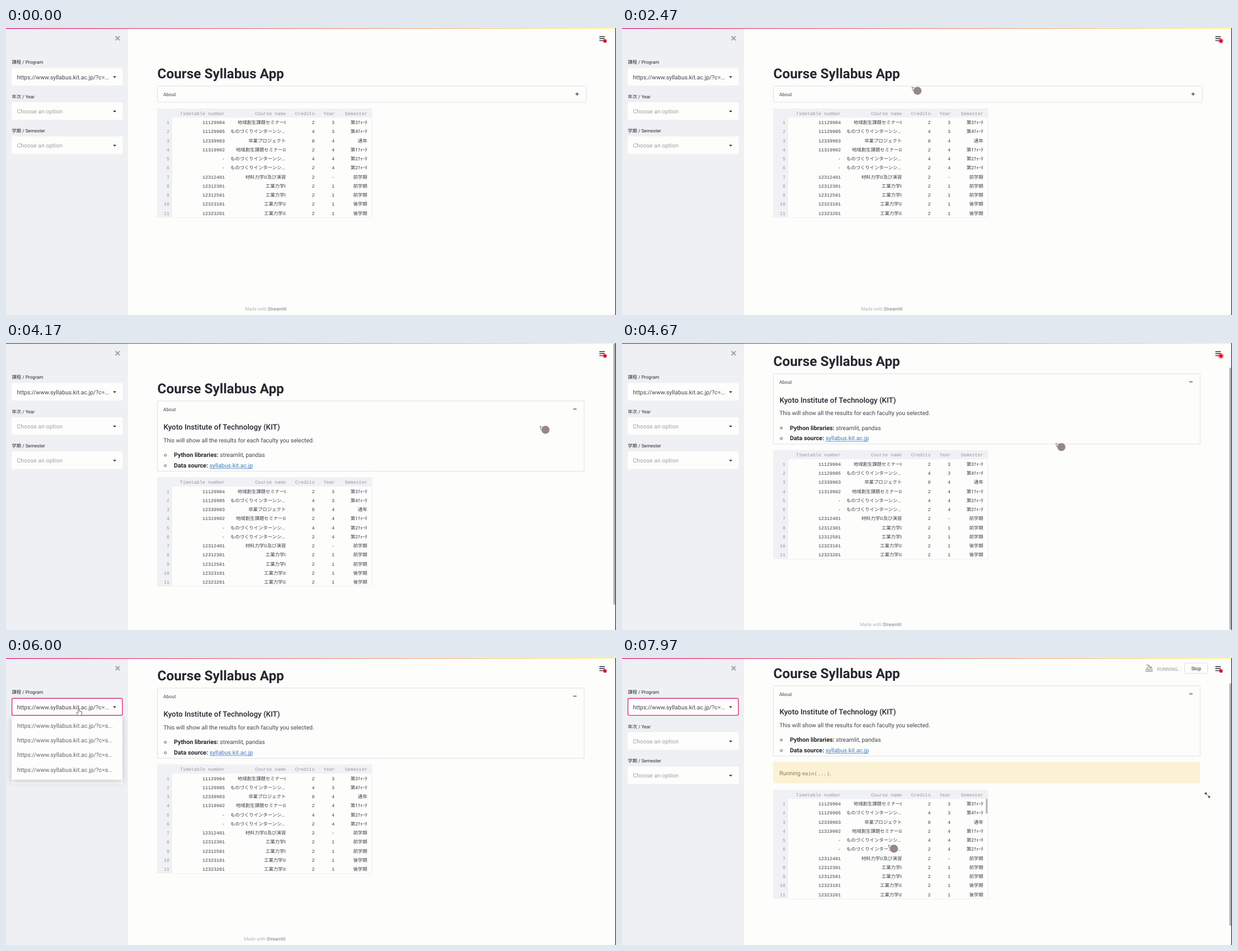
Animation, 1090 px wide and 514 px high, one loop 8 s. Source, as an HTML page with a canvas:

```html
<!DOCTYPE html>
<html lang="en">
<head>
<meta charset="utf-8">
<title>Course Syllabus App</title>
<style>
html, body { margin: 0; width: 100%; height: 100%; overflow: hidden; background: #fdfdfc; }
canvas { display: block; width: 1090px; height: 514px; }
</style>
</head>
<body>
<canvas id="stage"></canvas>
<script>
const W = 1090, H = 514, LOOP = 8000;
const canvas = document.getElementById('stage');
const c = canvas.getContext('2d');
const dpr = window.devicePixelRatio || 1;
canvas.width = W * dpr;
canvas.height = H * dpr;

const SANS = 'Roboto, "Noto Sans CJK JP", sans-serif';
const MONO = '"Liberation Mono", "Noto Sans CJK JP", monospace';
const MIXED = '"Liberation Serif", "Noto Sans CJK JP", serif';
const INK = '#262730', BODY = '#44454d', MUTED = '#a0a1a7';
const PAPER = '#fdfdfc', SIDE = '#eff0f3', PINK = '#d92f78';
const URL_TEXT = 'https://www.syllabus.kit.ac.jp/?c=';

// Times of the state changes
const OPEN = 3500, SCROLL = 4400, FOCUS = 5800, MENU = 6000, PICK = 7400, RUN = 7560;

// Pointer path: time, x, y
const PATH = [
  [500, -24, 70], [1230, 212, 87], [2470, 518, 106], [3300, 985, 117],
  [3600, 985, 118], [4170, 954, 149], [4970, 693, 194], [5700, 130, 90],
  [6300, 130, 90], [7070, 171, 150], [7380, 172, 150], [7970, 476, 335], [8000, 478, 336]
];

const ROWS = [
  ['11129904', '地域創生課題セミナーI', '2', '3', '第3ｸｫｰﾀ'],
  ['11129905', 'ものづくりインターンシ...', '4', '3', '第4ｸｫｰﾀ'],
  ['12339903', '卒業プロジェクト', '8', '4', '通年'],
  ['11319902', '地域創生課題セミナーII', '2', '4', '第1ｸｫｰﾀ'],
  ['-', 'ものづくりインターンシ...', '4', '4', '第2ｸｫｰﾀ'],
  ['-', 'ものづくりインターンシ...', '2', '4', '第2ｸｫｰﾀ'],
  ['12312401', '材料力学II及び演習', '2', '-', '前学期'],
  ['12312301', '工業力学I', '2', '1', '前学期'],
  ['12312501', '工業力学I', '2', '1', '前学期'],
  ['12323101', '工業力学II', '2', '1', '後学期'],
  ['12323201', '工業力学II', '2', '1', '後学期']
];
const HEADS = ['Timetable number', 'Course name', 'Credits', 'Year', 'Semester'];
const RIGHTS = [391, 500, 551.5, 587.5, 645.5];

const clamp = v => Math.max(0, Math.min(1, v));
const smooth = v => { v = clamp(v); return v * v * (3 - 2 * v); };
const menuOpen = t => t >= MENU && t < PICK;

function text(s, x, y, size, color, { weight = 400, font = SANS, align = 'left' } = {}) {
  c.font = `${weight} ${size}px ${font}`;
  c.textAlign = align;
  c.fillStyle = color;
  c.fillText(s, x, y);
  return c.measureText(s).width;
}

function rect(x, y, w, h, color) {
  c.fillStyle = color;
  c.fillRect(x, y, w, h);
}

function box(x, y, w, h, r, fill, stroke, line = 1) {
  c.beginPath();
  c.roundRect(x, y, w, h, r);
  if (fill) { c.fillStyle = fill; c.fill(); }
  if (stroke) { c.strokeStyle = stroke; c.lineWidth = line; c.stroke(); }
}

function lines(color, width, ...segs) {
  c.strokeStyle = color;
  c.lineWidth = width;
  c.beginPath();
  for (const [x1, y1, x2, y2] of segs) { c.moveTo(x1, y1); c.lineTo(x2, y2); }
  c.stroke();
}

function poly(color, ...pts) {
  c.fillStyle = color;
  c.beginPath();
  pts.forEach(([x, y]) => c.lineTo(x, y));
  c.closePath();
  c.fill();
}

function disc(x, y, r, color) {
  c.fillStyle = color;
  c.beginPath();
  c.arc(x, y, r, 0, 7);
  c.fill();
}

function pointerAt(t) {
  if (t < PATH[0][0]) return null;
  const i = PATH.findIndex(p => p[0] > t);
  const [t0, x0, y0] = PATH[i - 1], [t1, x1, y1] = PATH[i];
  const k = smooth((t - t0) / (t1 - t0));
  return { x: x0 + (x1 - x0) * k, y: y0 + (y1 - y0) * k };
}

function field(label, labelY, top, value, focused) {
  text(label, 10.5, labelY, 8.3, INK);
  box(10, top, 198.5, 31.5, 2.5, PAPER);
  if (focused) box(10.6, top + 0.6, 197.4, 30.4, 2.5, null, PINK, 1.4);
  text(value || 'Choose an option', 19.5, top + 20, 10.45, value ? BODY : MUTED);
  const y = top + 15;
  poly(INK, [191.3, y], [197, y], [194.15, y + 3]);
}

function menu(p) {
  c.save();
  c.shadowColor = 'rgba(30,32,45,0.25)';
  c.shadowBlur = 11;
  c.shadowOffsetY = 3;
  box(10, 104, 198, 114, 2, PAPER);
  c.restore();
  for (let i = 0; i < 4; i++) {
    const top = 108.5 + i * 26.1;
    if (p && p.x > 10 && p.x < 208 && p.y >= top && p.y < top + 26.1) rect(10, top, 198, 26.1, '#f0f1f4');
    text(URL_TEXT + 's...', 20, top + 16.7, 10.45, '#64656d');
  }
}

function sidebar(t, p) {
  rect(0, 0, 218, H, SIDE);
  lines('#9fa1a8', 2, [195.7, 14.7, 203, 22], [203, 14.7, 195.7, 22]);
  field('課程 / Program', 64, 71.6, URL_TEXT + '...', t >= FOCUS);
  field('年次 / Year', 126, 133.1, '');
  field('学期 / Semester', 187, 194.3, '');
  if (menuOpen(t)) menu(p);
}

function table(top, running) {
  const cell = (s, x, y, color, font) => text(s, x, y, 8.36, color, { font, align: 'right' });
  rect(270, top, 384, 16.5, '#f0f1f4');
  rect(270, top, 27, 195.5, '#f0f1f4');
  lines('#eeeff2', 1, [297, top + 195.5, 654, top + 195.5], [653.7, top, 653.7, top + 195.5]);
  HEADS.forEach((s, i) => cell(s, RIGHTS[i], top + 11.5, '#96979f', MONO));
  ROWS.forEach((row, r) => {
    const y = top + 28 + r * 16.25;
    cell(r + 1, 292, y, '#96979f', MONO);
    row.forEach((s, i) => {
      const mono = i !== 1 && i !== 4;
      const x = RIGHTS[i] - (i === 1 && s.endsWith('...') ? 1.5 : i === 3 ? 0.5 : 0);
      cell(s, x, y, '#3d3e46', mono ? MONO : i === 1 ? MIXED : SANS);
    });
  });
  if (running) box(650, top + 16, 3.2, 27, 1.6, '#b9babd');
}

function expander(y, h, right, open) {
  box(270.5, y, right - 270.5, h, 0.5, null, '#e0e1e3');
  text('About', 281, y + 18, 8.5, BODY);
  const mx = right - 16.5, my = y + 14.5;
  lines(INK, 1.1, [mx - 3, my, mx + 3, my]);
  if (!open) { lines(INK, 1.1, [mx, my - 3, mx, my + 3]); return; }
  c.save();
  c.beginPath();
  c.rect(270, y, right - 270, h);
  c.clip();
  text('Kyoto Institute of Technology (KIT)', 281.5, y + 51.5, 13.4, INK, { weight: 500 });
  text('This will show all the results for each faculty you selected.', 281.3, y + 73.7, 10.48, BODY);
  const item = (dy, name, value, link) => {
    c.strokeStyle = BODY;
    c.lineWidth = 0.9;
    c.beginPath();
    c.arc(284.7, y + dy - 3.3, 1.9, 0, 7);
    c.stroke();
    const x = 300 + text(name, 300, y + dy, 10.8, INK, { weight: 700 }) + 2.7;
    const color = link ? '#3a7bc0' : BODY;
    const w = text(value, x, y + dy, 10.48, color);
    if (link) lines(color, 0.8, [x, y + dy + 1.8, x + w, y + dy + 1.8]);
  };
  item(100.4, 'Python libraries:', 'streamlit, pandas');
  item(119.2, 'Data source:', 'syllabus.kit.ac.jp', true);
  c.restore();
}

function expandIcon(x, y) {
  lines(INK, 1.2, [x - 3, y - 3, x - 0.6, y - 0.6], [x + 0.8, y + 0.8, x + 3.2, y + 3.2]);
  poly(INK, [x - 4.5, y - 4.5], [x - 0.7, y - 4.5], [x - 4.5, y - 0.7]);
  poly(INK, [x + 4.7, y + 4.7], [x + 0.9, y + 4.7], [x + 4.7, y + 0.9]);
}

function page(t, p) {
  const open = t >= OPEN, running = t >= RUN;
  const grow = smooth((t - OPEN) / 220);
  const scroll = 50 * smooth((t - SCROLL) / 300) + (running ? 4 : 0);
  const extra = 50 * grow + (running ? 45 : 0);
  const right = open ? 1033 : 1037;
  const dy = -scroll;

  text('Course Syllabus App', 270.5, 89.6 + dy, 24.35, INK, { weight: 700 });
  expander(103.8 + dy, 29.2 + 96.6 * grow, right, open);

  let top = 144 + 96.5 * grow + dy;
  if (running) {
    box(270, top - 0.5, 763, 38.5, 2, '#fbf2d5');
    const w = text('Running ', 281.3, top + 23.3, 10.45, '#8f7c4b');
    const m = text('main(...)', 281.3 + w, top + 23.3, 9.15, '#8f7c4b', { font: MONO });
    text('.', 281.3 + w + m, top + 23.3, 10.45, '#8f7c4b');
    top += 49.5;
  }
  table(top, running);
  if (p && p.x > 270 && p.x < 1056 && p.y > top && p.y < top + 196) expandIcon(1046, top + 9.5);

  const fy = 505.5 + extra + dy, fx = open ? 425 : 427;
  const w = text('Made with ', fx, fy, 8.4, '#b3b4b8');
  text('Streamlit', fx + w, fy, 8.4, '#7b7c83');

  // The open menu locks scrolling
  if (open && !menuOpen(t)) {
    const k = H / (H + extra);
    rect(1085.5, scroll * k, 3, H * k, '#a9a9ab');
  }
}

function toolbar(t) {
  if (t >= RUN) {
    const g = '#9c9da2';
    disc(945.7, 17, 1.7, g);
    lines(g, 1.6, [937, 12.5, 941.5, 12.8], [941.5, 12.8, 944, 18.5], [942, 15, 937.5, 18.8]);
    for (const y of [20.7, 23.8]) {
      c.strokeStyle = g;
      c.lineWidth = 1.4;
      c.beginPath();
      for (let x = 935.5; x <= 948.5; x += 0.5) c.lineTo(x, y + 0.7 * Math.sin((x - 935) * 1.4));
      c.stroke();
    }
    text('RUNNING...', 956, 22.7, 8.5, g);
    box(1005.5, 9, 41, 18.8, 2, PAPER, '#dfe0e3');
    text('Stop', 1026, 21.7, 8.7, INK, { align: 'center' });
  }
  lines(INK, 1.4, [1060.3, 15.5, 1070, 15.5], [1060.3, 19, 1070, 19], [1060.3, 22.6, 1070, 22.6]);
  const pulse = Math.sin(Math.PI * t / 2000) ** 2;
  const r = 4.2 + 3 * pulse;
  const glow = c.createRadialGradient(1070.3, 23.2, 2, 1070.3, 23.2, r);
  glow.addColorStop(0, 'rgba(255,20,40,0.75)');
  glow.addColorStop(1, 'rgba(255,20,40,0)');
  disc(1070.3, 23.2, r, glow);
  disc(1070.3, 23.2, 2.8, '#e3061b');
}

function hand(x, y) {
  c.beginPath();
  c.moveTo(x - 1, y + 8);
  c.lineTo(x - 1, y + 0.6);
  c.quadraticCurveTo(x, y - 0.8, x + 1, y + 0.6);
  c.lineTo(x + 1, y + 5);
  c.lineTo(x + 5.4, y + 6);
  c.lineTo(x + 5.6, y + 9);
  c.lineTo(x + 4.2, y + 13);
  c.lineTo(x - 0.8, y + 13);
  c.lineTo(x - 4, y + 8.4);
  c.quadraticCurveTo(x - 3.4, y + 6.6, x - 1, y + 8);
  c.closePath();
  c.fillStyle = '#fff';
  c.fill();
  c.strokeStyle = '#55565c';
  c.lineWidth = 0.9;
  c.stroke();
}

function pointer(t, p) {
  const inMenu = menuOpen(t) && p.y > 104 && p.y < 218;
  const inField = p.y > 72 && p.y < 103.5;
  if (p.x > 10 && p.x < 208 && (inMenu || inField)) return hand(p.x, p.y);
  disc(p.x + 10, p.y + 6.5, 7.2, '#968789');
  c.beginPath();
  c.moveTo(p.x, p.y);
  c.lineTo(p.x + 6, p.y + 2);
  c.lineTo(p.x + 2, p.y + 6);
  c.closePath();
  c.fillStyle = '#fff';
  c.fill();
  c.strokeStyle = '#55505c';
  c.lineWidth = 0.8;
  c.stroke();
}

function draw(t) {
  c.setTransform(dpr, 0, 0, dpr, 0, 0);
  c.textRendering = 'geometricPrecision';
  rect(0, 0, W, H, PAPER);
  const p = pointerAt(t);
  page(t, p);
  sidebar(t, p);
  toolbar(t);
  const strip = c.createLinearGradient(0, 0, W, 0);
  strip.addColorStop(0, '#dd2278');
  strip.addColorStop(1, '#fcf98c');
  rect(0, 0, W, 1.4, strip);
  rect(1088.8, 0, 1.2, H, '#2b2b2d');
  if (p) pointer(t, p);
}

const start = performance.now();
function tick() {
  draw((performance.now() - start) % LOOP);
  requestAnimationFrame(tick);
}
tick();
</script>
</body>
</html>
```
